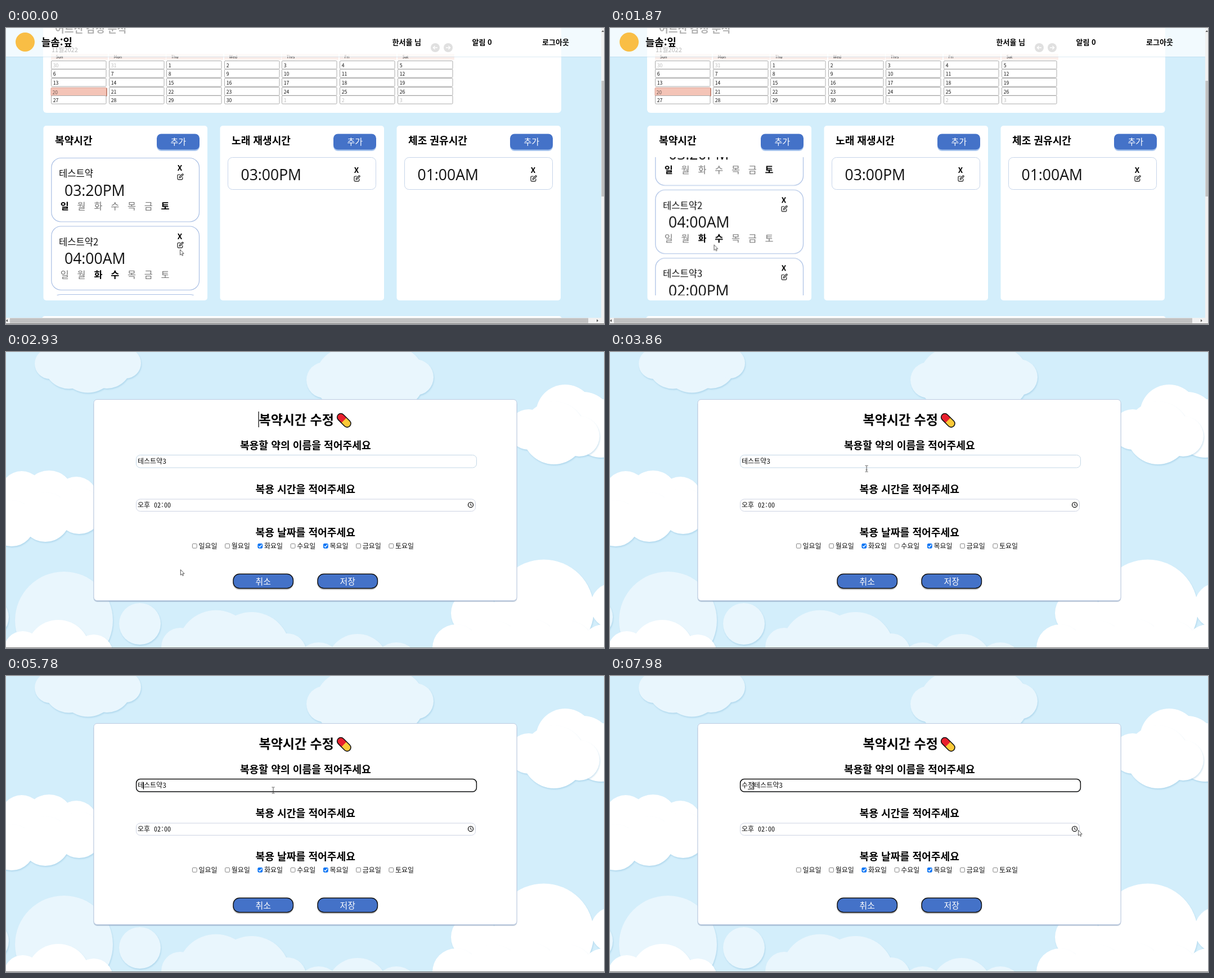
An HTML page that plays this animation: 1063 by 527 pixels, repeating every 8 s.

```html
<!DOCTYPE html>
<html lang="ko">
<head>
<meta charset="utf-8">
<title>복약시간</title>
<style>
html, body { margin: 0; width: 100%; height: 100%; overflow: hidden; background: #d3eefb; }
svg { position: fixed; left: 0; top: 0; width: 1063px; height: 527px; overflow: hidden; }
text { font-family: 'Noto Sans CJK KR', 'Noto Sans KR', 'Noto Sans CJK JP', 'Noto Sans CJK', sans-serif; fill: #111; white-space: pre; }
.b { font-weight: 700; fill: #000; }
.mid { text-anchor: middle; }
.time { font-family: 'Open Sans', 'Noto Sans', sans-serif; font-size: 26.5px; }
.mono { font-family: 'Noto Sans Mono CJK KR', 'Liberation Mono', monospace; }
.cloud { filter: drop-shadow(1px 2px 1px rgba(120, 180, 215, .35)); }
.pale { fill: #e9f6fd; }
.white { fill: #fff; }
.gray { fill: #777; }
.faint { fill: #bbb; }
</style>
</head>
<body>
<svg viewBox="0 0 1063 527">
  <defs>
    <g id="edit" fill="none" stroke="#111" stroke-width="1.15" stroke-linejoin="round" stroke-linecap="round">
      <path d="M5.5 2H2.5Q1 2 1 3.5V9.3Q1 10.8 2.5 10.8H8.3Q9.8 10.8 9.8 9.3V6.8"/>
      <path d="M4.2 7.8L4.7 5.6L9.3 1Q10 .4 10.8 1.1T10.8 2.6L6.3 7.2Z"/>
    </g>
    <clipPath id="listClip"><rect x="76" y="230.5" width="272" height="245.5"/></clipPath>
  </defs>

  <g id="board">
    <rect width="1063" height="527" fill="#d3eefb"/>
    <rect x="66" y="-20" width="921" height="171" rx="6" fill="#fff"/>
    <text class="b" x="87" y="8" font-size="18.2">어르신 감정 분석</text>
    <text x="81" y="43" font-size="11">11월2022</text>
    <g id="calendar"></g>
    <g fill="none" stroke="#fff" stroke-width="1.4">
      <circle cx="763" cy="35" r="8" fill="#999" stroke="none"/>
      <path d="M767 35H759.5M762.5 32L759.5 35L762.5 38"/>
      <circle cx="786" cy="35" r="8" fill="#999" stroke="none"/>
      <path d="M782 35H789.5M786.5 32L789.5 35L786.5 38"/>
    </g>
    <g id="cards"></g>
    <g clip-path="url(#listClip)"><g id="list"></g></g>
    <rect x="64" y="513" width="924" height="20" rx="5" fill="#fff"/>

    <rect y="51" width="1058" height="1" fill="#a5cbe2" opacity=".4"/>
    <rect width="1058" height="51" fill="#fff" opacity=".7"/>
    <circle cx="34" cy="25" r="17" fill="#f9be45"/>
    <text class="b" x="63" y="32" font-size="17.8">늘솜:잎</text>
    <text class="b" x="686.5" y="30" font-size="13">한서율 님</text>
    <text class="b" x="828.5" y="30" font-size="13">알림 0</text>
    <text class="b" x="953" y="30" font-size="13">로그아웃</text>
    <rect id="pageCaret" x="17" y="8" width="1" height="34" fill="#000"/>

    <rect x="1058" width="5" height="527" fill="#f1f1f1"/>
    <rect x="1058.5" y="94" width="4.5" height="206" fill="#c1c1c1"/>
    <path d="M1058.5 7L1061 4L1063 7Z" fill="#555"/>
    <rect y="516" width="1063" height="11" fill="#f1f1f1"/>
    <rect x="7" y="516.5" width="1028" height="9" fill="#c1c1c1"/>
    <path d="M3 518.5V523.5L0 521ZM1050 518.5V523.5L1053 521Z" fill="#555"/>
  </g>

  <g id="form">
    <rect width="1063" height="527" fill="#d3eefb"/>
    <g id="clouds"></g>
    <rect x="155.5" y="86" width="753" height="359" rx="7" fill="#8fa4c0" opacity=".55"/>
    <rect x="156" y="84.5" width="752" height="358" rx="6" fill="#fff" stroke="#bccbe2"/>
    <text class="b" x="449.5" y="128.5" font-size="23">복약시간 수정</text>
    <g transform="translate(600.8 121.7) rotate(45)">
      <rect x="-14.5" y="-6.5" width="29" height="13" rx="6.5" fill="#fcc938"/>
      <path d="M0 -6.5H-8A6.5 6.5 0 0 0 -8 6.5H0Z" fill="#e8202e"/>
      <rect x="-14.5" y="-6.5" width="29" height="13" rx="6.5" fill="none" stroke="#111" stroke-width="1.6"/>
    </g>
    <rect id="titleCaret" x="448.5" y="106" width="1.2" height="28" fill="#000"/>

    <text class="b mid" x="532.3" y="173" font-size="18.2">복용할 약의 이름을 적어주세요</text>
    <text class="b mid" x="532.3" y="251" font-size="18.2">복용 시간을 적어주세요</text>
    <text class="b mid" x="532.3" y="328" font-size="18.2">복용 날짜를 적어주세요</text>

    <rect x="231.5" y="183.5" width="605" height="22.5" rx="7" fill="#fff" stroke="#c3d7e6"/>
    <rect id="focus" x="231.6" y="183.6" width="604.8" height="22.4" rx="7" fill="none" stroke="#111" stroke-width="1.5"/>
    <g id="typed"></g>
    <rect id="mark" y="201" width="11" height="1" fill="#222"/>
    <rect id="caret" y="189" width="1" height="13" fill="#000"/>

    <rect x="231.5" y="262" width="603" height="21.5" rx="7" fill="#fff" stroke="#cdd3e2"/>
    <text x="234" y="276.5" font-size="12">오후</text>
    <text class="mono" x="263" y="276.5" font-size="12">02:00</text>
    <g fill="none" stroke="#111" stroke-width="1.3">
      <circle cx="826" cy="272.2" r="4.5"/>
      <path d="M826 269.5V272.4L828 273.6" stroke-width="1.1"/>
    </g>
    <g id="days"></g>
    <g id="buttons"></g>
  </g>

  <rect y="526" width="1063" height="1" fill="#777"/>

  <g id="cursor">
    <path id="arrow" d="M.5 .5V10.2L2.7 8.2L4.2 11.5L5.7 10.8L4.3 7.6H7.2Z" fill="#fff" stroke="#444" stroke-width=".9"/>
    <path id="beam" d="M-2.5 -5.5H-.8L0 -4.8L.8 -5.5H2.5M0 -4.8V4.8M-2.5 5.5H-.8L0 4.8L.8 5.5H2.5M-1.5 2H1.5" fill="none" stroke="#444" stroke-width=".9"/>
  </g>
</svg>

<script>
const fill = (id, parts) => { document.getElementById(id).innerHTML = parts.join(''); };
const text = (x, y, size, s, cls = '') => `<text x="${x}" y="${y}" font-size="${size}" class="${cls}">${s}</text>`;
const box = (x, y, w, h, r, extra) => `<rect x="${x}" y="${y}" width="${w}" height="${h}" rx="${r}" ${extra}/>`;
const line = (d, color, width = 1) => `<path d="${d}" fill="none" stroke="${color}" stroke-width="${width}"/>`;
const week = [...'일월화수목금토'];

// Calendar
function dayCell(x, y, n) {
  const day = n < 1 ? n + 31 : n > 30 ? n - 30 : n;
  if (n !== 20) {
    return box(x, y, 97.5, 14.6, 1.5, 'fill="#fff" stroke="#aaa"') + text(x + 3.2, y + 11.8, 8.6, day, n === day ? '' : 'faint');
  }
  return box(x - .5, y + .8, 99, 14.6, 1.5, 'fill="#f4c4b7" stroke="#d9a193"')
    + line(`M${x} ${y + 15.6}h98.5v-14`, '#a4553f')
    + `<g opacity=".6">${text(x + 2, y + 12.2, 8.6, day)}</g>`;
}
fill('calendar', ['Sun', 'Mon', 'Thu', 'Wed', 'Thrs', 'Fri', 'Sat'].map((name, col) => {
  const x = Math.round(80 + 102.6 * col) + .5;
  let out = box(x - .5, 46, 101, 10.5, 1, 'fill="#fbeeea"') + text(x + 8.3, 54.3, 7, name);
  for (let row = 0; row < 5; row++) out += dayCell(x, Math.round(57.6 + 15.7 * row) + .5, row * 7 + col - 1);
  return out;
}));

// Cards and medicine list
const icons = (x, y, gap) => text(x, y + 4.7, 13.5, 'X', 'mid b') + `<use href="#edit" x="${x - 5}" y="${y + gap}"/>`;
const cards = [['복약시간'], ['노래 재생시간', '03:00PM'], ['체조 권유시간', '01:00AM']];
fill('cards', cards.map(([title, time], i) => `<g transform="translate(${314 * i})">`
  + box(66.5, 174, 291.5, 311, 5, 'fill="#fff"')
  + text(87, 207, 18.1, title, 'b')
  + box(268, 191, 76, 28, 8, 'fill="#a8c5ee"')
  + box(268, 188.5, 76, 28, 8, 'fill="#4472c8"')
  + text(306.2, 208, 15, '추가', 'mid white')
  + (time ? box(80.5, 230.5, 263, 57, 8, 'fill="#fff" stroke="#c6d5ea"')
    + text(103.5, 270.5, 26.5, time, 'time') + icons(309, 253, 9) : '')
  + '</g>'));

const meds = [['테스트약', '03:20PM', '일토'], ['테스트약2', '04:00AM', '화수'], ['테스트약3', '02:00PM', '화목']];
fill('list', meds.map(([name, time, on], i) => `<g transform="translate(0 ${231.5 + 121.5 * i})">`
  + box(80.8, 0, 262.7, 113.5, 17, 'fill="#fff" stroke="#a9bfe4" stroke-width="1.2"')
  + text(94, 33.8, 16.6, name) + text(104, 67.2, 26.5, time, 'time')
  + week.map((d, k) => text(96.8 + 29.8 * k, 91.8, 16.3, d, on.includes(d) ? 'b' : 'gray')).join('')
  + icons(309, 17.8, 9.7) + '</g>'));

// Clouds: a row of puffs between two points, wider in the middle
function cloud(cls, x0, y0, x1, y1, r, swell, n = 3) {
  let puffs = '';
  for (let i = 0; i < n; i++) {
    const k = i / (n - 1);
    puffs += `<circle cx="${x0 + (x1 - x0) * k}" cy="${y0 + (y1 - y0) * k}" r="${r + swell * Math.sin(Math.PI * k)}"/>`;
  }
  return `<g class="cloud ${cls}">${puffs}</g>`;
}
fill('clouds', [
  cloud('pale', 78, 21, 213, 20, 27, 25, 5),
  cloud('pale', 566, 50, 728, 45, 32, 35, 5),
  cloud('white', 994, 110, 1058, 136, 52, 0),
  cloud('white', 929, 138, 1019, 150, 36, 20),
  cloud('white', 28, 250, 125, 260, 38, 6),
  cloud('white', 10, 305, 130, 283, 41, 3),
  cloud('pale', -32, 472, 238, 484, 37, 50),
  cloud('pale', 310, 525, 500, 535, 34, 40, 4),
  cloud('pale', 556, 557, 694, 557, 40, 15),
  cloud('white', 30, 531, 156, 537, 34, 23),
  cloud('white', 832, 465, 1080, 452, 41, 48),
  cloud('white', 800, 527, 1063, 527, 42, 10, 5)
]);

// Day boxes and buttons
fill('days', week.map((d, i) => {
  const x = 331.4 + 58.25 * i, on = '화목'.includes(d);
  return box(x, 341.4, 7.8, 7.8, 1.5, on ? 'fill="#0a75f5" stroke="#0a75f5"' : 'fill="#fff" stroke="#777" stroke-width=".9"')
    + (on ? line(`M${x + 1.3} 345.5l1.9 1.9l3.6 -4.4`, '#fff', 1.4) : '')
    + text(x + 11, 349.8, 12, d + '요일');
}));
fill('buttons', ['취소', '저장'].map((s, i) => {
  const x = 404 + 150 * i;
  return box(x - 1, 397.5, 108, 26, 12, 'fill="#000" opacity=".22"')
    + box(x, 395.3, 106.5, 25.4, 11, 'fill="#4472c8" stroke="#111" stroke-width="1.4"')
    + text(x + 53.2, 413.7, 14.8, s, 'mid white');
}));

// Timeline, in ms
const LOOP = 8000, BLINK = 530;
let css = '';
function track(id, frames, easing = 'step-end') {
  const body = frames.map(([t, rule]) => `${t / LOOP * 100}%{${rule}}`).join('');
  css += `@keyframes ${id}{${body}}#${id}{animation:${id} ${LOOP}ms ${easing} infinite}`;
}
const at = (x, y = 0) => `transform:translate(${x}px,${y}px)`;

// Opacity switches at each time given
const toggle = (id, first, times) => track(id, [0, ...times].map((t, i) => [t, `opacity:${(i + first) % 2}`]));

function blink(id, start, end) {
  const times = [];
  for (let t = start; t < end; t += BLINK) times.push(t);
  if (times.length % 2) times.push(end);
  toggle(id, 0, times);
}

// Eased moves of [start, end, x, y], resting in between
function glide(id, x, y, moves) {
  const frames = [[0, at(x, y)]];
  for (const [start, end, nx, ny] of moves) {
    frames.push([start, at(x, y)], [end, at(nx, ny)]);
    [x, y] = [nx, ny];
  }
  track(id, [...frames, [LOOP, at(x, y)]], 'ease');
}

toggle('board', 1, [2930]);
toggle('form', 0, [2930]);
toggle('focus', 0, [4190]);
toggle('arrow', 1, [3860, 7400]);
toggle('beam', 0, [3860, 7400]);
blink('pageCaret', 220, 2600);
blink('titleCaret', 2930, 4190);

glide('list', 0, 0, [[1625, 2410, 0, -120]]);
glide('cursor', 309, 394, [
  [70, 740, 308, 385.5],
  [1440, 1540, 184.5, 385.5],
  [2500, 2730, 309.8, 387],
  [3020, 4190, 464, 198],
  [4320, 4460, 475, 203.5],
  [7280, 7970, 832, 274]
]);

// Typing: each prefix with its start time
const typing = [['', 0], ['ㅅ', 5980], ['수', 6520], ['숮', 6620], ['수저', 6730], ['수정', 6850]];
fill('typed', typing.map(([s], i) => `<g id="typed${i}">${text(234, 199.4, 12, s + '테스트약3')}</g>`));
typing.forEach(([, start], i) => {
  const end = typing[i + 1]?.[1];
  toggle('typed' + i, start ? 0 : 1, [start, end].filter(Boolean));
});

// Caret and composing mark, placed by letter column
const column = (t, col, on = 1) => [t, `opacity:${on};${at(233 + 11 * col)}`];
const typedTo = [column(5980, 1), column(6730, 2)];
track('mark', [column(0, 0, 0), column(5980, .1), column(6730, 1.1)]);
track('caret', [
  column(0, 4.65, 0), column(4190, 4.65), column(4190 + BLINK, 4.65, 0),
  ...[5260, 5520, 5650, 5780, 5920].map((t, i) => column(t, 4 - i)),
  ...typedTo, column(6850 + BLINK, 2, 0), column(6850 + 2 * BLINK, 2)
]);

document.head.appendChild(document.createElement('style')).textContent = css;
</script>
</body>
</html>
```
